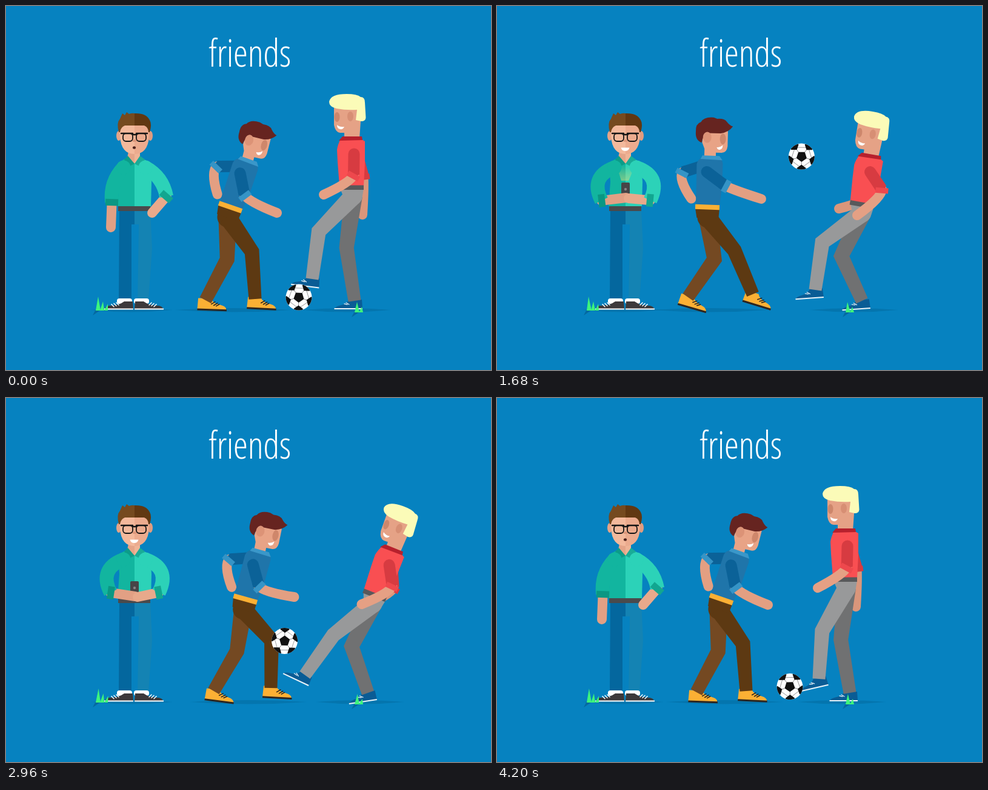
An HTML page with a canvas that plays this animation: 800x600 px, repeating every 4.24 s.

```html
<!DOCTYPE html>
<html lang="en">
<head>
<meta charset="utf-8">
<title>friends</title>
<style>
html, body { margin: 0; width: 100%; height: 100%; overflow: hidden; background: #0682c0; }
canvas, svg { position: absolute; left: 0; top: 0; }
text { font-family: "Noto Sans", sans-serif; font-size: 62px; font-weight: 300; font-stretch: 62.5%; letter-spacing: -.6px; fill: #fff; text-anchor: middle; }
</style>
</head>
<body>
<canvas width="800" height="600"></canvas>
<svg width="800" height="600"><text x="402" y="100">friends</text></svg>
<script>
const LOOP = 4240;
const KEYS = [0, 520, 1160, 1680, 2600, 3320, 4200];
const GROUND = 480;
const ctx = document.querySelector('canvas').getContext('2d');

// Use the narrowest light face available for the title.
const title = document.querySelector('text');
const faces = ['Noto Sans', 'Noto Sans ExtraCondensed', 'Open Sans', 'Open Sans Condensed', 'Roboto', 'Roboto Condensed', 'Lato'];
const widths = faces.map(face => {
  title.style.fontFamily = `"${face}", sans-serif`;
  return title.getComputedTextLength();
});
title.style.fontFamily = `"${faces[widths.indexOf(Math.min(...widths))]}", sans-serif`;

const rad = deg => deg * Math.PI / 180;
const mix = (a, b, u) => a + (b - a) * u;
const ease = (t, from, to) => {
  const u = Math.min(1, Math.max(0, (t - from) / (to - from)));
  return u * u * (3 - 2 * u);
};
const add = (p, q, k = 1) => [p[0] + q[0] * k, p[1] + q[1] * k];
const dist = (p, q) => Math.hypot(q[0] - p[0], q[1] - p[1]);
const unit = (p, q) => {
  const d = dist(p, q) || 1;
  return [(q[0] - p[0]) / d, (q[1] - p[1]) / d];
};
const normal = ([x, y]) => [-y, x];
const turn = ([x, y], deg) => {
  const c = Math.cos(rad(deg)), s = Math.sin(rad(deg));
  return [x * c - y * s, x * s + y * c];
};
const bezier = (a, b, c, u) => a.map((v, i) => mix(mix(v, b[i], u), mix(b[i], c[i], u), u));

// Cyclic monotone spline through a few key poses; a missing last pose repeats the first.
function track(poses, extra = {}) {
  const keys = KEYS.map((t, i) => [t, [].concat(poses[i] ?? poses[0])]);
  for (const t in extra) keys.push([+t, extra[t]]);
  keys.sort((a, b) => a[0] - b[0]);
  const n = keys.length;
  const key = i => {
    const lap = Math.floor(i / n), [t, v] = keys[i - lap * n];
    return [t + lap * LOOP, v];
  };
  const slope = (i, c) => {
    const [t0, a] = key(i), [t1, b] = key(i + 1);
    return (b[c] - a[c]) / (t1 - t0);
  };
  const tangent = (i, c) => {
    const a = slope(i - 1, c), b = slope(i, c);
    return a * b > 0 ? 2 * a * b / (a + b) : 0;
  };
  return t => {
    let i = n - 1;
    while (keys[i][0] > t) i--;
    const [t0, a] = key(i), [t1, b] = key(i + 1);
    const h = t1 - t0, u = (t - t0) / h;
    return a.map((v, c) => mix(v, b[c], u * u * (3 - 2 * u))
      + h * u * (1 - u) * ((1 - u) * tangent(i, c) - u * tangent(i + 1, c)));
  };
}

// Elbow or knee between two ends; side 1 bends to the left of a hanging limb, -1 to the right.
function joint(from, to, upper, lower, side) {
  const d = dist(from, to), u = unit(from, to);
  const stretch = Math.max(1, d / (.99 * (upper + lower)));
  const a = upper * stretch, b = lower * stretch;
  const x = (a * a - b * b + d * d) / (2 * d);
  return add(add(from, u, x), normal(u), side * Math.sqrt(Math.max(0, a * a - x * x)));
}

function fill(color, path) {
  ctx.fillStyle = color;
  ctx.fill(new Path2D(path));
}
function draw(color, width, path, cap = 'round') {
  ctx.strokeStyle = color;
  ctx.lineWidth = width;
  ctx.lineCap = cap;
  ctx.stroke(new Path2D(path));
}
const line = (color, width, a, b, cap) => draw(color, width, `M${a}L${b}`, cap);
const curve = (color, width, a, b, c, cap) => draw(color, width, `M${a}Q${b} ${c}`, cap);
function oval(color, x, y, rx, ry = rx) {
  ctx.fillStyle = color;
  ctx.beginPath();
  ctx.ellipse(x, y, rx, ry, 0, 0, 7);
  ctx.fill();
}
function box(color, x, y, w, h, r) {
  ctx.fillStyle = color;
  ctx.beginPath();
  ctx.roundRect(x, y, w, h, r);
  ctx.fill();
}
function within([x, y], deg, paint, flip = 1) {
  ctx.save();
  ctx.translate(x, y);
  ctx.rotate(rad(deg));
  ctx.scale(flip, 1);
  paint();
  ctx.restore();
}

function leg(color, hip, ankle, [thigh, shin], side) {
  const knee = joint(hip, ankle, thigh, shin, side);
  const a = normal(unit(hip, knee)), b = normal(unit(knee, ankle));
  const m = unit([0, 0], add(a, b));
  const k = 12 / (m[0] * a[0] + m[1] * a[1]);
  fill(color, 'M' + [add(hip, a, 15), add(knee, m, k), add(ankle, b, 10.5),
    add(ankle, b, -10.5), add(knee, m, -k), add(hip, a, -15)].join('L') + 'Z');
}
function arm(shoulder, hand, [upper, lower], side, look) {
  const elbow = joint(shoulder, hand, upper, lower, side);
  const u = unit(shoulder, elbow), w = unit([0, 0], add(u, unit(elbow, hand)));
  curve(look.skin, 16, elbow, add(elbow, w, 14), hand);
  line(look.sleeve, 19, shoulder, add(elbow, u, -6));
  line(look.sleeve, 19, add(elbow, u, -7), add(elbow, u, -1), 'butt');
  line(look.cuff, 21, add(elbow, w, -3), add(elbow, w, 6), 'butt');
}
function shadow(x0, x1) {
  const m = (x0 + x1) / 2;
  fill('#0475ae', `M${x0} 501Q${m} 495 ${x1} 501Q${m} 508 ${x0} 501Z`);
}
function grass(x, y, heights, sway) {
  fill('#0569a0', `M${x - 1} ${y}L${x - 5} ${y + 8}L${x + 7} ${y}Z`);
  heights.forEach((h, i) => {
    const left = x + i * 7;
    fill('#3df57c', `M${left} ${y}L${left + 4 + i + sway} ${y - h}L${left + 8 - i} ${y}Z`);
  });
}

// Standing friend with the phone
function standShoe() {
  fill('#3c393b', 'M1 487H15Q24 494 40 494Q46 495 47 499H0Z');
  fill('#fff', 'M0 498.500H48V500.500H0Z');
  for (let x = 24; x < 34; x += 4) line('#fff', 1.5, [x, 493 + (x - 24) / 3], [x + 4, 489 + (x - 24) / 3]);
}
function standArm(shoulder, hand, lower, side, bulge, [sleeve, cuff, skin]) {
  const elbow = joint(shoulder, hand, 59, lower, side);
  const middle = add(shoulder, add(elbow, shoulder, -1), .5);
  const bend = add(middle, normal(unit(shoulder, elbow)), side * bulge);
  const u = unit(elbow, hand);
  line(skin, 16, elbow, hand);
  curve(sleeve, 23, shoulder, bend, elbow, 'butt');
  oval(sleeve, ...shoulder, 11.5);
  line(cuff, 21, add(elbow, u, -5), add(elbow, u, 6), 'butt');
}
function standHead(smiling) {
  oval('#e5a488', 186, 214, 4, 8);
  oval('#df9c80', 238, 214, 4, 8);
  fill('#f3b99c', 'M188 194H212V244Q190 244 188 215Z');
  fill('#ecab8e', 'M236 194H212V244Q234 244 236 215Z');
  fill('#754a1f', 'M186 208Q182 192 188 186L192 177L196 180L199 175L203 178Q208 176 212 177V197H196Q189 200 188 208Z');
  fill('#613812', 'M212 177Q231 176 237 188Q241 195 237 208H235Q235 200 228 197H212Z');
  oval('#dc967a', 212, 222, 3.5, 2);
  ctx.strokeStyle = '#151515';
  ctx.lineWidth = 1.8;
  for (const x of [193, 215]) {
    ctx.beginPath();
    ctx.roundRect(x, 210, 16, 13, 5);
    ctx.stroke();
  }
  draw('#151515', 2.4, 'M190 210H209M215 210H233M209 212H215');
  if (smiling) fill('#fff', 'M204.500 233.500H218.500Q217 239 211.500 239Q206 239 204.500 233.500Z');
  else oval('#4c201b', 211.5, 233.5, 2.6, 2.2);
}
function drawStand(t) {
  shadow(140, 275);
  fill('#04679e', 'M187 335H212V360H207V485H186Z');
  fill('#1483b3', 'M212 335H238L241 400L235 486H217L219 360H212Z');
  for (const x of [183, 211]) box('#fff', x, 482, 25, 9, 4);
  within([210, 0], 0, standShoe, -1);
  within([212, 0], 0, standShoe);

  fill('#e5a488', 'M203 235H212V262L200 250Z');
  fill('#efb496', 'M212 235H221V250L212 262Z');
  fill('#12b59f', 'M200 250L185 258L187 290L184 330H212V260Z');
  fill('#2cd2b8', 'M222 250L238 258L240 290L239 330H212V260Z');
  fill('#0c9c88', 'M201 247L212 260L200 266L195 253Z');
  fill('#19ac97', 'M221 247L212 260L224 266L229 253Z');
  fill('#4a4a4c', 'M185 330H238V338H185Z');
  standHead(t > 1440 && t < 3800);

  ctx.globalAlpha = Math.max(0, 1 - Math.abs(t - 1680) / 500);
  const glow = ctx.createLinearGradient(0, 288, 0, 262);
  glow.addColorStop(0, 'rgba(225,222,120,.5)');
  glow.addColorStop(1, 'rgba(225,222,120,0)');
  ctx.fillStyle = glow;
  ctx.fill(new Path2D('M205 288L197 262H228L217 288Z'));
  ctx.globalAlpha = 1;

  // 0: hands down, 1: phone held up, sinking a little while reading
  const held = ease(t, 80, 1000) - ease(t, 3400, 4160);
  const y = 316 + 11 * ease(t, 1680, 2500);
  const left = bezier([173, 365], [225, 368], [213, y], held);
  const right = bezier([241, 341], [269, 371], [217, y + 1], held);
  if (held > .25) within(add(right, [-5, mix(2, -15, held)]), -75 * (1 - held), () => {
    box('#474547', -7, -11, 14, 23, 2);
    oval('#858385', 0, 0, 2.2);
  });
  const bulge = 14 + 19 * held;
  standArm([194, 266], left, 41, 1, bulge, ['#12b59f', '#0b9783', '#e2a084']);
  standArm([230, 266], right, 36, -1, bulge, ['#2cd2b8', '#12a690', '#e8a98b']);
}

// Dark-haired player: body is x and lean, foot is x, y and pitch
const dark = {
  body: track([[370, 19], [367, 14], [395, 25], [347, 2], [395, 17], [394, 14]]),
  foot: track([[411, 483, 3], [411, 483, 3], [434, 472, 4], [422, 475, 17], [446, 485, 2], [430, 471, 4]], { 2290: [468, 462, -6] }),
  farFoot: track([[329, 485], [331, 485], [338, 482], [315, 480], [367, 488], [318, 478]]),
  hand: track([[447, 341], [429, 332], [490, 333], [436, 318], [474, 329], [476, 327]])
};
const blueArm = { sleeve: '#0b6298', cuff: '#3594c6', skin: '#e39f82' };
function darkShoe() {
  fill('#fbb034', 'M-12 -3H9Q13 5 25 7Q35 9 35 15H-13Z');
  fill('#2d2620', 'M-13 14H35.500V17H-13Z');
  draw('#2d2620', 1.6, 'M10 6L16 2M14 8L20 4M18 9L23 6');
}
function darkHead() {
  fill('#e8a386', 'M-13 -42H28V-17Q27 -6 18 -6H9V3H-10V-12L-14 -22Z');
  fill('#662420', 'M-15 -22Q-26 -26 -25 -40Q-26 -53 -17 -56Q-12 -65 4 -64L10 -62Q22 -63 26 -57Q31 -51 36 -50Q29 -40 16 -38H-4Q-13 -36 -15 -22Z');
  oval('#dc9377', -6, -31, 7, 9);
  oval('#cf876b', 20, -29, 5, 9);
  fill('#fff', 'M10 -15Q16 -15 20 -19Q20 -11 14 -11Q11 -12 10 -15Z');
}
function drawDark(t) {
  const [x, lean] = dark.body(t), belt = [x, 331.5];
  const at = p => add(belt, turn(p, lean));
  const hip = at([1, 17]), foot = dark.foot(t), farFoot = dark.farFoot(t);
  const heelLift = Math.max(-5, 2.8 * (485 - farFoot[1]) + 2);
  shadow(x - 92, x + 102);
  arm(at([-15, -66]), at([-27, -13]), [30, 46], 1, blueArm);
  within(farFoot, heelLift, darkShoe);
  leg('#744922', hip, farFoot, [70, 76], -1);
  within(foot, foot[2], darkShoe);
  oval('#5d3912', ...hip, 17);
  leg('#5d3912', hip, foot, [70, 78], -1);
  within(belt, lean, () => fill('#5d3912', 'M-20 2H20L19 18H-17Z'));
  within(at([2, -84]), .75 * lean, darkHead);
  within(belt, lean, () => {
    fill('#1f75aa', 'M-19 -3H20L23 -35V-72Q22 -80 17 -81H-12Q-19 -78 -20 -70Z');
    fill('#3a97c9', 'M-14 -79L-11 -85H17L22 -78Z');
    fill('#fbb034', 'M-20 -4H20V4H-20Z');
  });
  arm(at([-3, -58]), dark.hand(t), [37, 61], 1, blueArm);
}

// Fair-haired player: body is x, y and lean, foot is x, y and pitch
const fair = {
  body: track([[570, 299, 0], [570, 299, 0], [596, 320, 17], [602, 327, 10], [603, 326, 19], [589, 305, 0], [574, 299, 0]], { 2900: [609, 326, 23] }),
  foot: track([[505, 450, 7], [528, 448, 1], [530, 445, 3], [525, 468, -4], [494, 464, 34], [578, 486, 0], [531, 463, -13]],
    { 800: [540, 472, 0], 2900: [488, 455, 28] }),
  farFoot: track([575, 576, 581, 602, 603, 589, 582]),
  hand: track([[524, 311], [534, 325], [606, 339], [594, 345], [606, 344], [559, 333], [529, 313]])
};
const redArm = { sleeve: '#d73b41', cuff: '#ee484d', skin: '#e5a084' };
const redFarArm = { sleeve: '#d73b41', cuff: '#d73b41', skin: '#da967b' };
function fairShoe() {
  fill('#0a5c95', 'M-12 -2H9Q13 5 22 7Q32 9 33 13H-13Z');
  fill('#e8f2f8', 'M-13 12H33.500V14H-13Z');
  draw('#d5e7f2', 1.4, 'M9 6L14 3M12 6L17 5');
}
function fairHead() {
  fill('#e5a286', 'M-30 -52H14V-26L12 3H-13V-7H-20Q-28 -8 -30 -20Z');
  fill('#fbfbb8', 'M-38 -58Q-36 -71 -9 -71Q8 -71 14 -66Q21 -66 21 -57L22.500 -32Q22 -26 15 -26L6 -28L8 -45Q-10 -44 -26 -47Q-38 -50 -38 -58Z');
  oval('#cd876c', -25, -33, 4.5, 8);
  oval('#d78f74', -3, -34, 5, 8);
  fill('#fff', 'M-25 -20Q-20 -16 -13 -17Q-15 -12 -20 -13Q-25 -14 -25 -20Z');
}
function drawFair(t) {
  const [x, y, lean] = fair.body(t), belt = [x, y];
  const at = p => add(belt, turn(p, lean));
  const hip = at([3, 14]), foot = fair.foot(t), farFoot = [fair.farFoot(t)[0], 486];
  const swing = ease(t, 60, 520) - ease(t, 2700, 3400);
  const farHand = add(belt, [mix(18, -38, swing), mix(45, 7, swing)]);
  arm(at([9, -55]), farHand, [36, 60], -1, redFarArm);
  within(farFoot, -.4 * lean, fairShoe, -1);
  leg('#707172', hip, farFoot, [79, 81], 1);
  within(foot, foot[2], fairShoe, -1);
  oval('#98999a', ...hip, 15);
  leg('#98999a', hip, foot, [82, 79], 1);
  within(belt, lean, () => fill('#98999a', 'M-19 2H20L18 14H-14Z'));
  within(at([1, -83]), .9 * lean, fairHead);
  within(belt, lean, () => {
    fill('#f94f52', 'M-20 -3H20L22 -40V-76L15 -80H-18Q-23 -70 -24 -62L-23 -42Z');
    fill('#b7202d', 'M-21 -77L-15 -84H17L18 -78Z');
    fill('#58595b', 'M-20 -3.500H20V4H-20Z');
  });
  arm(at([4, -55]), fair.hand(t), [35, 59], -1, redArm);
}

// The ball rolls under the foot, then flies freely between touches
const touches = [[800, 483, GROUND], [1160, 507, 380], [2290, 497, 438], [2900, 455, 432],
  [3320, 487, 287], [3980, 483, GROUND], [LOOP, 483, GROUND]];
function ballAt(t) {
  const i = touches.findIndex(p => p[0] > t);
  if (i === 0) return [483 + 7 * Math.sin(Math.PI * t / 800), GROUND];
  const [t0, x0, y0] = touches[i - 1], [t1, x1, y1] = touches[i];
  const u = (t - t0) / (t1 - t0), s = (t1 - t0) / 1000;
  return [mix(x0, x1, u), mix(y0, y1, u) - 500 * s * s * u * (1 - u)];
}
function pentagon(r) {
  return 'M' + [0, 72, 144, 216, 288].map(a => turn([r, 0], a)).join('L') + 'Z';
}
function drawBall(t) {
  within(ballAt(t), 20 + 360 * t / LOOP, () => {
    oval('#fff', 0, 0, 21.5);
    ctx.beginPath();
    ctx.arc(0, 0, 21.5, 0, 7);
    ctx.clip();
    draw('#777', .7, pentagon(18.5));
    fill('#111', pentagon(9));
    for (let a = 0; a < 360; a += 72) within([0, 0], a, () => {
      draw('#777', .8, 'M9 0H14');
      within([21.5, 0], 180, () => fill('#111', pentagon(8)));
    });
  });
}

function frame(now) {
  const t = Math.floor(now % LOOP / 40) * 40;
  ctx.fillStyle = '#0682c0';
  ctx.fillRect(0, 0, 800, 600);
  const stance = fair.farFoot(t)[0];
  shadow(stance - 86, stance + 60);
  drawStand(t);
  drawDark(t);
  drawFair(t);
  drawBall(t);
  const sway = Math.sin(4 * Math.PI * t / LOOP);
  grass(148, 502, [23, 15, 11], sway);
  grass(575, 505, [17, 9], sway);
  requestAnimationFrame(() => frame(performance.now() - start));
}
const start = performance.now();
frame(0);
</script>
</body>
</html>
```
